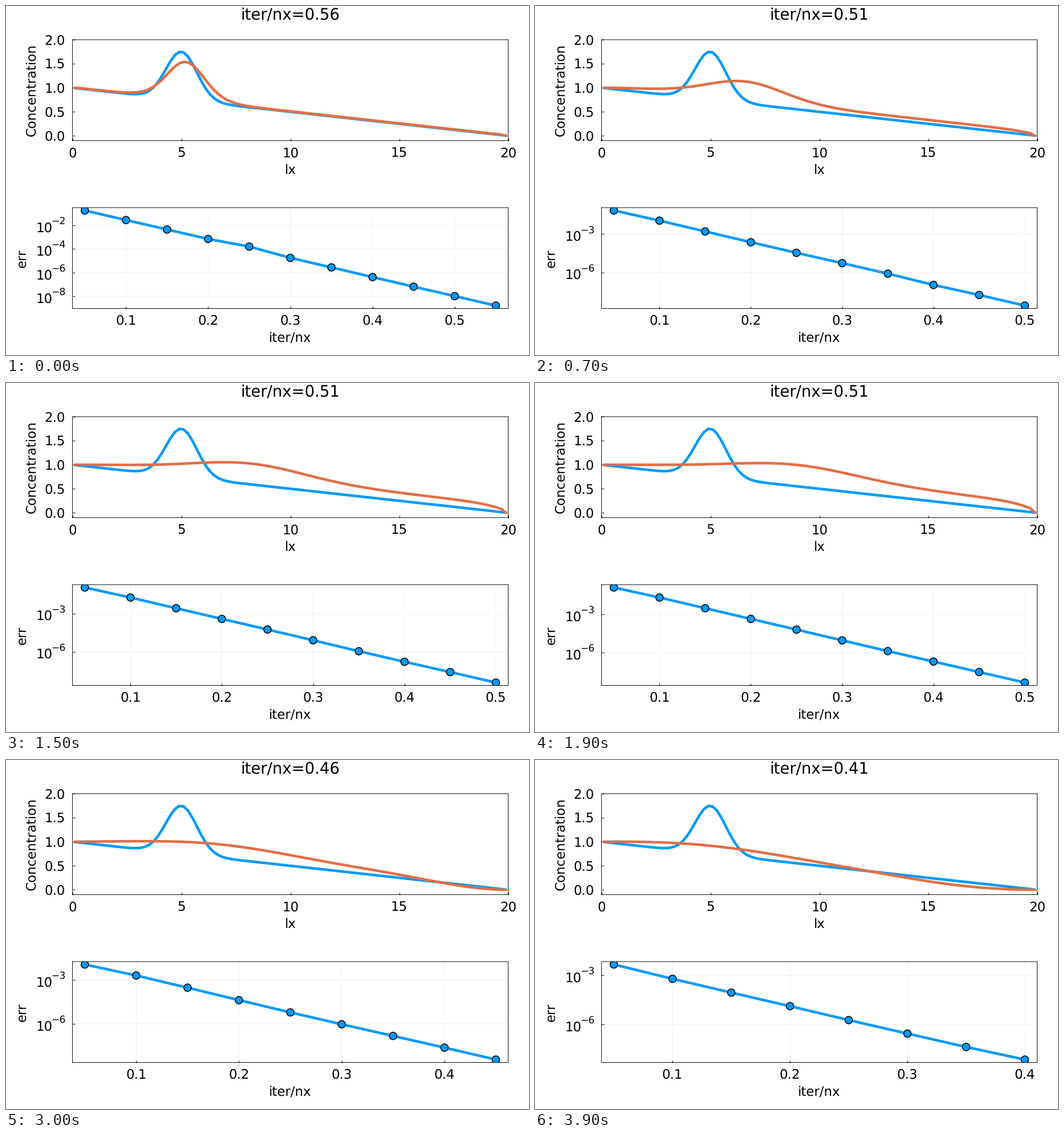
These frames come from a looping animation (917x611 px, 4 s). A matplotlib script:

```python
import numpy as np
import matplotlib.pyplot as plt
from matplotlib.animation import FuncAnimation

W, H, DPI = 917, 611, 64
PT = 72 / DPI                      # points per pixel
BLUE, ORANGE = "#009AFA", "#E36F47"
LABEL, TITLE, POWER = 22.92, 27.5, 17.2   # font sizes in pixels
LEFT, RIGHT = 116.6, 880.5
TOP_BOX = (59, 235.7)
LOW_BOX = (353, 529.5)
MID = (LEFT + RIGHT) / 2

plt.rcParams["font.family"] = "DejaVu Sans"
plt.rcParams["text.hinting"] = "none"

# Physics and numerics
LX, DC, NX, NT, TOL = 20.0, 1.0, 100, 40, 1e-8
DX = LX / NX
DT = DX
RE = np.pi + np.sqrt(np.pi**2 + LX**2 / DC / DT)
RHO = (LX / (DC * RE))**2
DTAU = DX * np.sqrt(RHO)
CHECK = 5
xc = np.linspace(DX / 2, LX - DX / 2, NX)
start = 1 + np.exp(-(xc - LX / 4)**2) - xc / LX


def simulate():
    """Implicit diffusion by pseudo-transient steps, then upwind advection."""
    c, q, vx = start.copy(), np.zeros(NX - 1), 1.0
    states = []
    for it in range(1, NT + 1):
        old = c.copy()
        steps, errs = [], []
        n, err = 0, 1.0
        while err >= TOL and n < 10 * NX:
            n += 1
            q -= DTAU / (RHO * DC + DTAU) * (q + DC * np.diff(c) / DX)
            rate = (c[1:-1] - old[1:-1]) / DT + np.diff(q) / DX
            c[1:-1] -= DTAU / (1 + DTAU / DT) * rate
            if n % CHECK == 0:
                flux = DC * np.diff(c) / DX
                err = np.abs(np.diff(flux) / DX
                             - (c[1:-1] - old[1:-1]) / DT).max()
                steps.append(n / NX)
                errs.append(np.log10(err))
        slope = np.diff(c) / DX
        c[1:-1] -= DT * (max(vx, 0) * slope[:-1] + min(vx, 0) * slope[1:])
        c[0], c[-1] = 1, 0
        if it % (NT // 2) == 0:
            vx = -vx
        states.append((c.copy(), np.array(steps), np.array(errs), n + 1))
    return states


states = simulate()

fig = plt.figure(figsize=(W / DPI, H / DPI), dpi=DPI, facecolor="white")


def make_axes(box):
    top, bottom = box
    ax = fig.add_axes([LEFT / W, 1 - bottom / H,
                       (RIGHT - LEFT) / W, (bottom - top) / H])
    ax.tick_params(direction="in", length=4 * PT, width=PT,
                   labelbottom=False, labelleft=False)
    for spine in ax.spines.values():
        spine.set_linewidth(0.95 * PT)
        spine.set_snap(False)
    ax.set_axisbelow(True)
    return ax


def write(x, y, text, size=LABEL, ha="center", rotation=0):
    """Text with its baseline at pixel y (or x when rotated)."""
    return fig.text(x / W, 1 - y / H, text, fontsize=size * PT, ha=ha,
                    va="baseline", rotation=rotation, rotation_mode="anchor")


def curve(ax, color):
    return ax.plot([], [], color=color, lw=4.6 * PT, solid_capstyle="round",
                   solid_joinstyle="round")[0]


def widen(values):
    lo, hi = values.min(), values.max()
    pad = 0.03 * (hi - lo)
    return lo - pad, hi + pad


# Upper plot
upper = make_axes(TOP_BOX)
upper.set(xlim=(0, LX), ylim=(-0.1, 2.0),
          xticks=range(0, 21, 5), yticks=np.arange(0, 2.1, 0.5))
curve(upper, BLUE).set_data(xc, start)
profile = curve(upper, ORANGE)
for v in range(0, 21, 5):
    write(LEFT + v / LX * (RIGHT - LEFT), 264.3, str(v))
for v in np.arange(0, 2.1, 0.5):
    y = TOP_BOX[0] + (2 - v) / 2.1 * (TOP_BOX[1] - TOP_BOX[0])
    write(103.7, y + 8.4, f"{v:.1f}", ha="right")
write(MID, 293.7, "lx")
write(51.5, 147.3, "Concentration", rotation=90)
title = write(MID, 23.2, "", TITLE)

# Lower plot
lower = make_axes(LOW_BOX)
lower.grid(color="black", alpha=0.08, lw=0.76 * PT, snap=False)
history = curve(lower, BLUE)
dots = lower.scatter([], [], s=(13 * PT)**2, edgecolor="black",
                     linewidth=1.5 * PT, zorder=2.2)
write(MID, 587.6, "iter/nx")
write(35.5, 441.3, "err", rotation=90)
tick_texts = []


def draw(i):
    c, steps, errs, count = states[i]
    profile.set_data(xc, c)
    history.set_data(steps, errs)
    dots.set_offsets(np.column_stack([steps, errs]))
    # One colour per dot keeps their places exact below a pixel
    dots.set_facecolor([BLUE] * len(steps))
    title.set_text(f"iter/nx={count / NX:.2f}")

    x0, x1 = widen(steps)
    y0, y1 = widen(errs)
    step = 2 if y0 <= -9 else 3
    xticks = [k / 10 for k in range(1, 10) if k / 10 <= x1]
    yticks = [e for e in range(-12, 0) if e % step == 0 and y0 <= e <= y1]
    lower.set_xticks(xticks)
    lower.set_yticks(yticks)
    lower.set_xlim(x0, x1)
    lower.set_ylim(y0, y1)

    while tick_texts:
        tick_texts.pop().remove()
    for v in xticks:
        x = LEFT + (v - x0) / (x1 - x0) * (RIGHT - LEFT)
        tick_texts.append(write(x, 558, f"{v:.1f}"))
    for e in yticks:
        y = LOW_BOX[0] + (y1 - e) / (y1 - y0) * (LOW_BOX[1] - LOW_BOX[0])
        tick_texts.append(write(52, y + 11.5, "10", ha="left"))
        tick_texts.append(write(79.2, y - 2, f"\u2212{-e}", POWER, "left"))
    return [profile, history, dots, title, *tick_texts]


anim = FuncAnimation(fig, draw, frames=NT, interval=100,
                     init_func=lambda: draw(0), repeat=True, repeat_delay=0,
                     blit=False)
plt.show()
```
